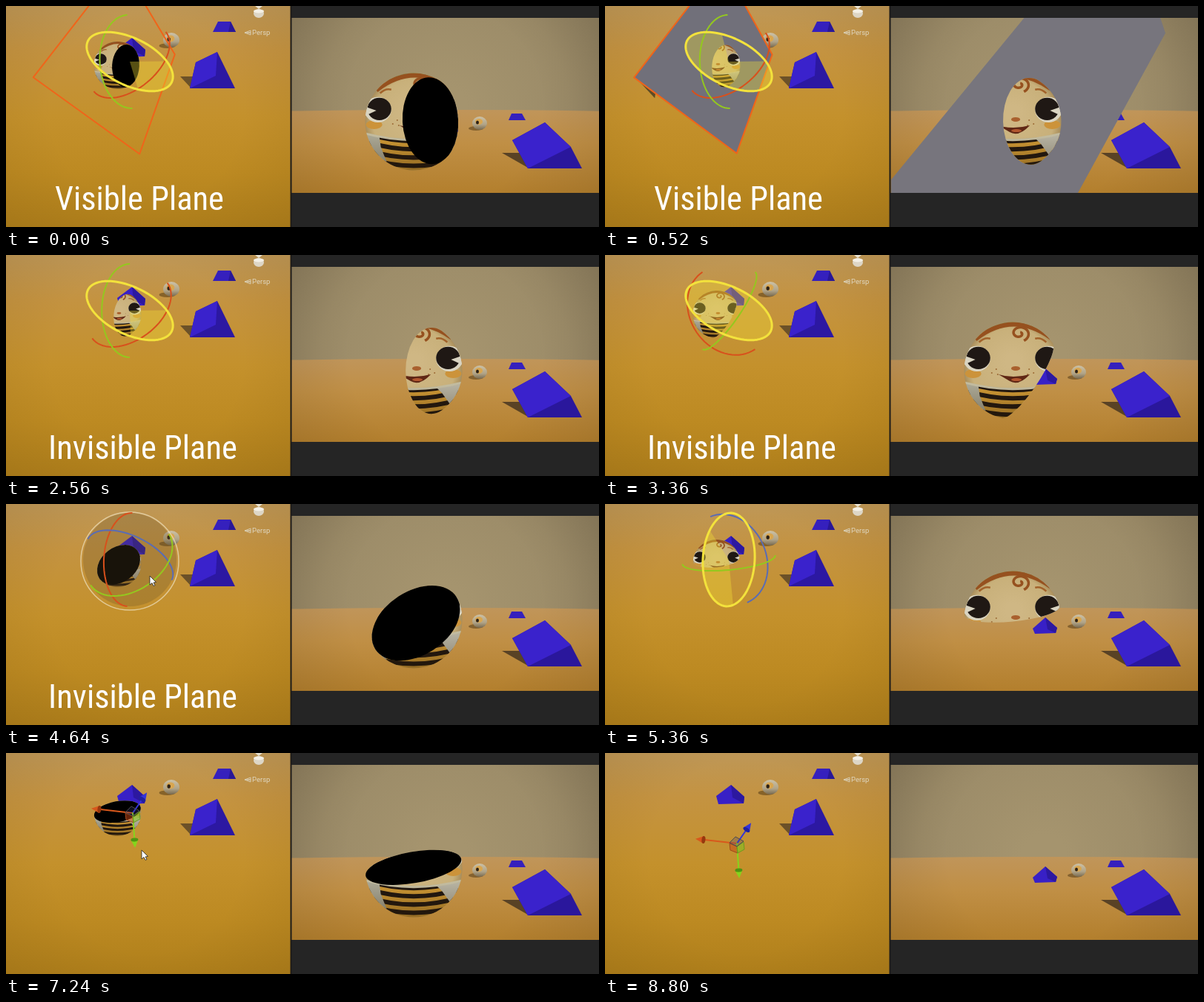
An HTML page with a canvas for the animation above (8960 ms loop, 800 by 298 pixels).

```html
<!DOCTYPE html>
<html lang="en">
<head>
<meta charset="utf-8">
<title>Cutting plane</title>
<style>
html, body { margin: 0; width: 100%; height: 100%; overflow: hidden; background: #252525; }
canvas { display: block; }
</style>
</head>
<body>
<canvas id="stage" width="800" height="298"></canvas>
<script>
const ctx = document.getElementById('stage').getContext('2d');
const LOOP = 8960, TAU = Math.PI * 2, RAD = Math.PI / 180;
const YELLOW = '#f3e23c', RED = '#d8501c', GREEN = '#94c81e', BLUE = '#5a6cb4';

// Vectors: x right, y down, z towards the viewer
const mix = (a, p, b, q) => a.map((v, i) => v * p + b[i] * q);
const dot = (a, b) => a[0] * b[0] + a[1] * b[1] + a[2] * b[2];
const cross = (a, b) => [a[1] * b[2] - a[2] * b[1], a[2] * b[0] - a[0] * b[2], a[0] * b[1] - a[1] * b[0]];
const unit = a => a.map(v => v / Math.hypot(...a));
const turn = (a, b, deg) => mix(a, Math.cos(deg * RAD), b, Math.sin(deg * RAD));

const A = unit([.38, -.77, -.5]), U = unit([.9, .44, 0]), V = cross(A, U);
const PIVOT = mix(mix(U, .43, V, .215), 1, A, .45);

const smooth = k => k * k * (3 - 2 * k);
const linear = k => k;
// Value at t between [time, value] pairs
function track(t, keys, ease = linear) {
  let i = 1;
  while (i < keys.length - 1 && t > keys[i][0]) i++;
  const [t0, v0] = keys[i - 1], [t1, v1] = keys[i];
  return v0 + (v1 - v0) * ease(Math.min(1, Math.max(0, (t - t0) / (t1 - t0))));
}

function poly(points, fill, stroke, width) {
  ctx.beginPath();
  points.forEach(p => ctx.lineTo(p[0], p[1]));
  ctx.closePath();
  if (fill) { ctx.fillStyle = fill; ctx.fill(); }
  if (stroke) { ctx.strokeStyle = stroke; ctx.lineWidth = width; ctx.stroke(); }
}
function oval(x, y, rx, ry, fill, rot = 0) {
  ctx.beginPath();
  ctx.ellipse(x, y, rx, ry, rot, 0, TAU);
  ctx.fillStyle = fill;
  ctx.fill();
}
function curve(x0, y0, cx, cy, x1, y1, color, width) {
  ctx.beginPath();
  ctx.moveTo(x0, y0);
  ctx.quadraticCurveTo(cx, cy, x1, y1);
  ctx.strokeStyle = color;
  ctx.lineWidth = width;
  ctx.stroke();
}
function fade(g, stops) {
  stops.forEach(([at, color]) => g.addColorStop(at, color));
  return g;
}
function box(x, y, w, h, fill) {
  ctx.fillStyle = fill;
  ctx.fillRect(x, y, w, h);
}

// Painted ball, radius 65 around the origin
function paintFace() {
  box(-66, -66, 132, 132, fade(ctx.createRadialGradient(0, -12, 10, 0, 0, 66),
    [[0, '#cfb784'], [.8, '#c8b07a'], [1, '#a58a58']]));
  ctx.beginPath();
  ctx.moveTo(-66, -30);
  ctx.lineTo(-48, -44);
  ctx.quadraticCurveTo(0, -81, 49, -46);
  ctx.lineTo(66, -30);
  ctx.lineTo(66, -70);
  ctx.lineTo(-66, -70);
  ctx.fillStyle = '#b98534';
  ctx.fill();
  curve(-42, -52, 0, -79, 44, -52, '#7f8559', 3);
  curve(-50, -42, 0, -81, 51, -44, '#96511f', 6);
  ctx.beginPath();
  for (let a = 0; a < 8.5; a += .2) {
    const r = 2 + a * 1.4;
    ctx.lineTo(9 + Math.cos(a - 1) * r, -50 + Math.sin(a - 1) * r * .8);
  }
  ctx.lineWidth = 3.5;
  ctx.stroke();
  for (const s of [-1, 1]) {
    curve(s * 45, -38, s * 38, -45, s * 30, -43, '#a2622a', 2.5);
    oval(s * 53, 4, 11, 6, '#cc933a');
    oval(s * 48, -16, 18, 17, '#d9d4c2');
    oval(s * 46, -17, 16, 15, '#1f1814');
    poly([[s * 65, -20], [s * 50, -15], [s * 65, -8]], '#d9d4c2');
    for (const [x, y] of [[22, -2], [28, 3], [20, 5]]) oval(s * x, y, 1, 1, '#9c6a35');
  }
  oval(4, -3, 6, 3, '#a9602e');
  ctx.beginPath();
  ctx.moveTo(-19, 5);
  ctx.quadraticCurveTo(0, 11, 23, 5);
  ctx.quadraticCurveTo(8, 21, -4, 14);
  ctx.fillStyle = '#5f2715';
  ctx.fill();
  oval(5, 12, 7, 2, '#b2562f');

  ctx.save();
  ctx.beginPath();
  ctx.moveTo(-66, 15);
  ctx.quadraticCurveTo(0, 34, 66, 15);
  ctx.lineTo(66, 66);
  ctx.lineTo(-66, 66);
  ctx.clip();
  box(-66, 10, 132, 58, '#cd9734');
  for (let y = 24; y < 70; y += 11) curve(-60, y - 7, 0, y + 11, 60, y - 7, '#211710', 6);
  poly([[-66, 14], [-46, 20], [-44, 34], [-36, 54], [-50, 46], [-64, 30]], '#a9a693');
  poly([[66, 14], [30, 22], [38, 30], [48, 44], [62, 36]], '#b5b1a0');
  ctx.restore();
  curve(-64, 16, 0, 33, 64, 16, '#c2bb9f', 3);
  box(-66, -66, 132, 132, fade(ctx.createLinearGradient(0, 20, 0, 66),
    [[0, 'rgba(40,25,5,0)'], [1, 'rgba(40,25,5,.35)']]));
}

// Ball without the part where dot(n, point) > d
function cutBall(x, y, r, n, d) {
  if (d <= -1) return;
  const s = Math.hypot(n[0], n[1]), c = n[2], k = d / s;
  const rim = Math.sqrt(Math.max(0, 1 - d * d)) * 65;
  const angle = Math.atan2(n[1], n[0]);
  const disc = () => {
    ctx.moveTo(d * s * 65 + rim * Math.abs(c), 0);
    ctx.ellipse(d * s * 65, 0, rim * Math.abs(c), rim, 0, 0, TAU);
  };
  ctx.save();
  ctx.translate(x, y);
  ctx.scale(r / 65, r / 65);
  ctx.save();
  ctx.rotate(angle);
  ctx.beginPath();
  if (k > -1) {
    const b = Math.acos(Math.min(1, k));
    ctx.arc(0, 0, 65, b, TAU - b);
    ctx.closePath();
  }
  disc();
  ctx.clip();
  ctx.rotate(-angle);
  paintFace();
  ctx.restore();
  if (c > 0) {
    ctx.rotate(angle);
    ctx.beginPath();
    disc();
    ctx.fillStyle = '#000';
    ctx.fill();
  }
  ctx.restore();
}

function smallBall(x, y, r) {
  oval(x - r * .5, y + r * .7, r, r * .3, 'rgba(60,40,10,.45)');
  oval(x, y, r, r * .9, fade(ctx.createLinearGradient(0, y - r, 0, y + r),
    [[0, '#cfc4a8'], [.6, '#b0a386'], [1, '#6e6048']]));
  oval(x - r * .1, y - r * .2, r * .5, r * .4, '#d8a650');
  oval(x - r * .3, y - r * .1, r * .2, r * .25, '#2a2018');
}

// Square plane with its corners in perspective
function corners(x, y, side, half, length, depth) {
  return [[-1, 1], [-1, -1], [1, -1], [1, 1]].map(([a, b]) => {
    const p = mix(A, a * length, side, b * half), f = depth / (depth - p[2]);
    return [x + p[0] * f, y + p[1] * f];
  });
}
const facing = q => (q[2][0] - q[0][0]) * (q[3][1] - q[1][1]) - (q[2][1] - q[0][1]) * (q[3][0] - q[1][0]) < 0;

const GX = 167, GY = 75, GR = 63;
const onRing = (e1, e2, deg) => {
  const p = turn(e1, e2, deg);
  return [GX + p[0] * GR, GY + p[1] * GR];
};
function ring(normal, color, full, width = 2) {
  const m = unit(mix([0, 0, 1], 1, normal, -normal[2])), e = cross(normal, m);
  const end = full ? 180 : 90;
  ctx.beginPath();
  for (let t = -end; t <= end; t += 5) ctx.lineTo(...onRing(m, e, t));
  ctx.strokeStyle = color;
  ctx.lineWidth = width;
  ctx.stroke();
}
// Swept angle; every full turn adds one more layer
function sector(e1, e2, from, sweep) {
  while (sweep) {
    const part = Math.max(-360, sweep), points = [[GX, GY]];
    for (let i = 0; i <= 72; i++) points.push(onRing(e1, e2, from + part * i / 72));
    poly(points, 'rgba(240,222,55,.36)');
    sweep -= part;
  }
}

function rotateGizmo(t, s) {
  const third = cross(s.side, s.n);
  const spin = t < 1720 || (t >= 2160 && t < 3960);
  if (spin) {
    sector(U, V, 45, s.phi - (t < 1720 ? 158 : -376));
    ring(s.side, RED);
    ring(s.n, GREEN);
    ring(A, YELLOW, true, 3);
  } else if (t >= 4680 && t < 6360) {
    sector(s.n0, A, 0, s.theta);
    ring(third, BLUE);
    ring(s.n, GREEN);
    ring(s.side, YELLOW, true, 3);
  } else {
    oval(GX, GY, GR, GR, 'rgba(95,75,40,.25)');
    ctx.beginPath();
    ctx.arc(GX, GY + 2, 66, 0, TAU);
    ctx.strokeStyle = 'rgba(235,220,185,.75)';
    ctx.lineWidth = 1.5;
    ctx.stroke();
    ring(s.side, RED);
    ring(third, BLUE);
    ring(s.n, GREEN);
  }
}

function arrow(x, y, dx, dy, color, dark) {
  const len = Math.hypot(dx, dy), ux = dx / len, uy = dy / len;
  const at = (a, b) => [x + ux * a - uy * b, y + uy * a + ux * b];
  poly([at(0, 0), at(len - 8, 0)], null, color, 2);
  poly([at(len + 2, 0), at(len - 9, 5), at(len - 9, -5)], color);
  const [bx, by] = at(len - 9, 0);
  oval(bx, by, 2.5, 5, dark, Math.atan2(uy, ux));
}
function moveGizmo(x, y) {
  arrow(x, y, 18, -26, '#3434d8', '#2020a0');
  arrow(x, y, -54, -6, '#d8581c', '#96380e');
  arrow(x, y, 3, 45, '#86d41c', '#4f9412');
  poly([[x - 10, y], [x, y + 4], [x + 1, y + 13], [x - 9, y + 9]], 'rgba(200,70,20,.5)', '#a0481a', 1);
  poly([[x, y + 4], [x + 9, y - 2], [x + 10, y + 8], [x + 1, y + 13]], 'rgba(120,200,30,.5)', '#6c9c20', 1);
  poly([[x - 10, y - 1], [x - 2, y - 9], [x + 9, y - 3], [x, y + 4]], 'rgba(60,60,120,.25)', '#4c4a50', 1);
}

function cursor(x, y) {
  poly([[0, 0], [0, 12], [3, 9.5], [5, 13.5], [7, 12.5], [5, 9], [8.5, 8.5]].map(p => [x + p[0], y + p[1]]),
    '#fff', '#222', .8);
}

function leftScene() {
  box(0, 0, 385, 298, fade(ctx.createLinearGradient(0, 0, 0, 298),
    [[0, '#be9757'], [.2, '#c49341'], [.5, '#c4912c'], [.75, '#bd8a22'], [1, '#af7f1b']]));
  box(0, 0, 385, 298, fade(ctx.createRadialGradient(190, 140, 130, 190, 140, 260),
    [[0, 'rgba(90,60,10,0)'], [1, 'rgba(90,60,10,.13)']]));
  poly([[286, 21], [303, 21], [310, 35], [279, 35]], '#3520bd');
  poly([[303, 21], [310, 35], [300, 35]], '#291796');
  smallBall(223, 46, 11);
  poly([[235, 95], [254, 95], [250, 111]], '#6c5128');
  poly([[256, 76], [285, 62], [309, 111], [248, 111]], '#2c18a2');
  poly([[256, 76], [285, 62], [283, 94], [248, 111]], '#3a22cc');
  poly([[150, 58], [170, 43], [188, 59], [187, 68], [153, 69]], '#3820c6');
  poly([[170, 43], [188, 59], [187, 68], [172, 60]], '#2c18a0');
}

function rightScene() {
  box(385, 0, 415, 298, '#252525');
  box(385, 16, 415, 236, fade(ctx.createRadialGradient(592, 140, 30, 592, 140, 260),
    [[0, '#a5946e'], [.6, '#9b8b68'], [1, '#897b5d']]));
  ctx.save();
  ctx.beginPath();
  ctx.rect(385, 16, 415, 236);
  ctx.clip();
  oval(592, 440, 2000, 300, fade(ctx.createLinearGradient(0, 140, 0, 252),
    [[0, '#c0955a'], [.4, '#c08f45'], [1, '#b37f2d']]));
  box(385, 16, 415, 236, fade(ctx.createRadialGradient(592, 134, 130, 592, 134, 260),
    [[0, 'rgba(50,35,15,0)'], [1, 'rgba(50,35,15,.13)']]));
  ctx.restore();
  poly([[682, 145], [696, 145], [701, 154], [678, 154]], '#3520bd');
  smallBall(639, 158, 10);
  poly([[669, 198], [694, 198], [704, 218]], '#594225');
  poly([[683, 181], [727, 157], [762, 190], [777, 219], [704, 219]], '#2a179c');
  poly([[683, 181], [727, 157], [762, 190], [704, 219]], '#3a22cc');
  poly([[577, 168], [594, 153], [610, 167], [608, 174], [580, 175]], '#3820c6');
  poly([[594, 153], [610, 167], [608, 174], [597, 169]], '#2c18a0');
}

function viewLabel() {
  poly([[336, 0], [341, 4], [346, 0]], '#e9e2d0');
  oval(341, 10, 7, 6, '#ddd6c6');
  oval(341, 7, 7, 2.5, '#f4f0e6');
  poly([[330, 33], [322, 36], [330, 39]], null, '#d8ccb0', 1);
  poly([[322, 36], [330, 36]], null, '#d8ccb0', 1);
  ctx.fillStyle = '#e0d6bf';
  ctx.font = '9.5px Roboto, "Liberation Sans", sans-serif';
  ctx.textAlign = 'left';
  ctx.fillText('Persp', 332, 39);
}

// Tall, narrow title face: the narrowest one available
const titleFont = (size, family) => `extra-condensed ${size}px "${family}", sans-serif`;
function titleWidth(family) {
  ctx.font = titleFont(100, family);
  return ctx.measureText('Invisible Plane').width;
}
const narrow = ['Noto Sans ExtraCondensed', 'Noto Sans', 'Roboto Condensed', 'Open Sans']
  .reduce((a, b) => titleWidth(b) < titleWidth(a) ? b : a);
function title(text, x) {
  const size = Math.min(56, 25500 / titleWidth(narrow));
  ctx.font = titleFont(size, narrow);
  ctx.textAlign = 'center';
  ctx.fillStyle = '#fff';
  ctx.fillText(text, x, 275);
}

function pose(t) {
  const phi = track(t, [[0, 48], [1200, -372], [1400, -376], [2160, -376], [3360, -736], [3880, -950]]);
  const theta = track(t, [[4660, 0], [5960, -265], [6320, -330]]);
  const shift = track(t, [[7000, 0], [7240, .1], [7900, -1.33], [8480, 1.5]], smooth);
  const n0 = turn(U, V, phi), side = turn(U, V, phi - 90);
  const n = turn(n0, A, theta);
  return { phi, theta, n0, side, n, shift, d: dot(n, PIVOT) - shift };
}

function draw(t) {
  const s = pose(t), planeOn = t < 1760;

  rightScene();
  if (planeOn) {
    ctx.save();
    ctx.beginPath();
    ctx.rect(386, 16, 414, 236);
    ctx.clip();
    ctx.translate(607, 143);
    ctx.rotate(.12);
    const q = corners(0, 0, s.side, 130, 330, 600);
    if (facing(q)) poly(q, '#77757d');
    ctx.restore();
  }
  cutBall(550, 156, 65.5, s.n, s.d);

  ctx.save();
  ctx.beginPath();
  ctx.rect(0, 0, 384, 298);
  ctx.clip();
  leftScene();
  const quad = corners(168, 75, s.side, 91, 91, 263);
  if (planeOn && facing(quad)) {
    const [x, y] = quad[0];
    poly([[x + 3, y + 1], [x + 34, y - 14], [x + 28, y + 28]], '#5c4a26');
    poly(quad, '#71707a');
  }
  const tilt = .13, [nx, ny, nz] = s.n;
  cutBall(150.5, 80, 32, [nx, ny * Math.cos(tilt) + nz * Math.sin(tilt), nz * Math.cos(tilt) - ny * Math.sin(tilt)], s.d);
  if (planeOn) poly(quad, null, '#f0641a', 2);
  viewLabel();

  const mx = 170.5 + 5 * s.shift, my = 78 + 29.3 * s.shift;
  if (t < 6800) rotateGizmo(t, s);
  else moveGizmo(mx, my);

  if (t >= 3960 && t < 4680) {
    const k = track(t, [[4000, 0], [4360, 1]], smooth);
    cursor(215 - 21 * k, 125 - 28 * k);
  } else if (t >= 6360 && t < 8640) {
    const k = track(t, [[6360, 0], [7000, 1]], smooth);
    cursor(mx + 24 - 12 * k, my + 20 + 30 * k);
  }
  if (t < 1000) title('Visible Plane', 180);
  else if (t >= 2160 && t < 5000) title('Invisible Plane', 184.5);
  ctx.restore();
  box(383.5, 0, 2, 298, '#1d1b19');
}

function frame(now) {
  draw(Math.floor(now % LOOP / 40) * 40);
  requestAnimationFrame(frame);
}
ctx.lineJoin = 'round';
requestAnimationFrame(frame);
</script>
</body>
</html>
```
